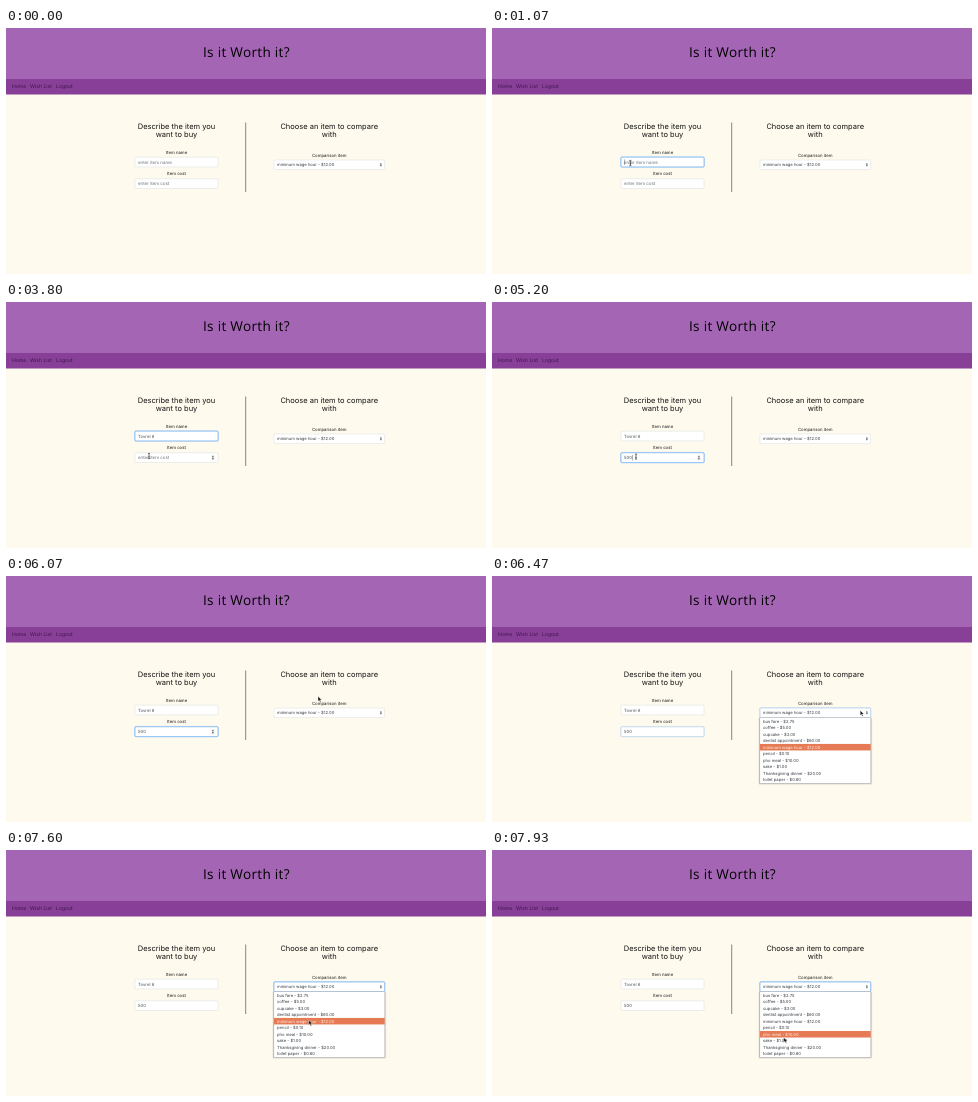
Write an HTML page that moves like this. It is 480 by 246 pixels and loops after 8 s.

```html
<!DOCTYPE html>
<html lang="en">
<head>
<meta charset="utf-8">
<title>Is it Worth it?</title>
<style>
  html, body { margin: 0; width: 100%; height: 100%; overflow: hidden; background: #fefaed; }
  svg { display: block; width: 100vw; height: 100vh; }
  text { font-family: Inter, "Open Sans", sans-serif; white-space: pre; text-rendering: geometricPrecision; }
  .mid { text-anchor: middle; }
  .title { font: 13.6px "Open Sans", sans-serif; letter-spacing: .3px; }
  .nav { font-size: 5.1px; fill: #43164f; }
  .head { font-size: 7.5px; fill: #151515; }
  .label { font-size: 4.3px; fill: #151515; }
  .hint { font-size: 4.45px; fill: #6c757d; }
  .value { font-size: 4.3px; fill: #495057; }
  .option { font-size: 4.17px; fill: #343a40; }
</style>
</head>
<body>
<svg id="stage" viewBox="0 0 480 246" preserveAspectRatio="none">
  <rect width="480" height="51" fill="#a565b5"/>
  <rect y="51" width="480" height="15.5" fill="#873f98"/>
  <text class="title mid" x="240.4" y="28.6">Is it Worth it?</text>
  <text class="nav" x="6" y="60.4">Home</text>
  <text class="nav" x="24" y="60.4">Wish List</text>
  <text class="nav" x="50" y="60.4">Logout</text>
  <text class="head mid" x="170.5" y="101">Describe the item you</text>
  <text class="head mid" x="170.5" y="109.2">want to buy</text>
  <text class="head mid" x="323.2" y="101">Choose an item to compare</text>
  <text class="head mid" x="323.2" y="109.2">with</text>
  <rect x="239.2" y="94.5" width="1" height="69.5" fill="#858585"/>
  <text class="label mid" x="170.5" y="125.8">Item name</text>
  <text class="label mid" x="170.5" y="147.4">Item cost</text>
  <text class="label mid" x="323.2" y="128.5">Comparison item</text>
</svg>
<script>
const TICK = 200 / 3, TICKS = 120;
const stage = document.getElementById('stage');

function add(tag, attrs, parent = stage, content = '') {
  const el = document.createElementNS('http://www.w3.org/2000/svg', tag);
  for (const k in attrs) el.setAttribute(k, attrs[k]);
  el.textContent = content;
  parent.append(el);
  return el;
}
const set = (el, name, value) => el.setAttribute(name, value);
const show = (el, on) => set(el, 'visibility', on ? 'visible' : 'hidden');
const ramp = (n, from, to) => Math.min(1, Math.max(0, (n - from) / (to - from)));

// White control with a blue focus ring on top
function control(x, y, w, h) {
  const box = { x, y, width: w, height: h, rx: 1.1 };
  add('rect', { ...box, fill: '#fff', stroke: '#ced4da', 'stroke-width': .4 });
  const ring = add('g', { fill: 'none', opacity: 0 });
  add('rect', { x: x - .4, y: y - .4, width: w + .8, height: h + .8, rx: 1.4,
    stroke: '#007bff', 'stroke-opacity': .28, 'stroke-width': .9 }, ring);
  add('rect', { ...box, stroke: '#6fb2fa', 'stroke-width': .5 }, ring);
  return ring;
}

function field(y, hint, value, typed, carets) {
  const ring = control(129, y, 83, 9.7);
  const base = y + 6.4;
  return {
    y, value, typed, carets, ring,
    hint: add('text', { class: 'hint', x: 132, y: base }, stage, hint),
    text: add('text', { class: 'value', x: 132, y: base }),
    caret: add('rect', { y: y + 2.2, width: .4, height: 5.4, fill: '#333' })
  };
}

// carets: [on, off] spans in ticks
const nameField = field(129.2, 'enter item name', 'Tovrel 6',
  [27, 31, 34, 37, 38, 40, 41, 43], [[14, 23], [27, 46]]);
const costField = field(150.8, 'enter item cost', '500', [70, 76, 78], [[61, 68], [70, 84]]);
const fields = [nameField, costField];

const spinner = add('g', {});
add('rect', { x: 205.4, y: 153, width: 3, height: 5.4, rx: .5, fill: '#eee' }, spinner);
add('path', { d: 'M205.9 155.2l1-1.5 1 1.5zM205.9 156.2l1 1.5 1-1.5z', fill: '#444' }, spinner);

const selectRing = control(268, 132, 110.6, 9.6);
add('text', { class: 'option', x: 271, y: 138.2 }, stage, 'minimum wage hour - $12.00');
add('path', { d: 'M373.9 136.4l1-1.4 1 1.4zM373.9 137.2l1 1.4 1-1.4z', fill: '#343a40' });

const items = ['bus fare - $2.75', 'coffee - $5.00', 'cupcake - $3.00',
  'dentist appointment - $60.00', 'minimum wage hour - $12.00', 'pencil - $0.10',
  'pho meal - $10.00', 'sake - $1.00', 'Thanksgiving dinner - $20.00', 'toilet paper - $0.60'];
const TOP = 141.8, ROW = 6.53;
const menu = add('g', {});
[.06, .1, .16].forEach((a, i) => add('rect', { x: 266.4 + i * .5, y: TOP, width: 113.8 - i,
  height: 67 - i * .5, rx: 1, fill: '#000', 'fill-opacity': a }, menu));
add('rect', { x: 267.9, y: TOP - .1, width: 110.9, height: 65.6, fill: '#fff',
  stroke: '#a9a9a9', 'stroke-width': .35 }, menu);
const bar = add('rect', { x: 268, width: 110.7, height: ROW, fill: '#e57a54' }, menu);
const options = items.map((s, i) =>
  add('text', { class: 'option', x: 271, y: TOP + ROW * i + 4.75 }, menu, s));

const arrow = add('path', { d: 'M0 0v5l1.2-1.1.9 2 .9-.4-.9-1.9h1.6z',
  fill: '#111', stroke: '#fff', 'stroke-width': .4 });
const beam = add('path', { d: 'M-1-2.7q1 0 1 .6 0-.6 1-.6M0-2.1v4.2M-1 2.7q1 0 1-.6 0 .6 1 .6M-.6.9h1.2',
  fill: 'none', stroke: '#111', 'stroke-width': .6 });

// Pointer path: tick, x, y
const path = [
  [4, 13, 116], [6, 75, 122], [8, 122, 131], [10, 138.4, 135],
  [53, 138.4, 135], [55, 140, 145], [57, 143, 154], [59, 144, 154.6],
  [84, 144, 154.6], [87, 190, 134], [90, 275, 117], [93, 386, 127], [96, 368.2, 134.4],
  [103, 368.2, 134.4], [106, 352, 146], [109, 327.4, 151.2],
  [112, 312, 160], [115, 298, 175], [119, 289.6, 191.6]
];
function pointer(n) {
  const i = path.findIndex(p => p[0] >= n);
  if (i < 1) return path[i < 0 ? path.length - 1 : 0].slice(1);
  const [a, ax, ay] = path[i - 1], [b, bx, by] = path[i];
  const k = (n - a) / (b - a);
  return [ax + (bx - ax) * k, ay + (by - ay) * k];
}

function draw(time) {
  const n = Math.floor((time + 1) / TICK) % TICKS;
  const [x, y] = pointer(n);
  const over = f => n >= 4 && x > 129 && x < 212 && y > f.y && y < f.y + 9.7;

  for (const f of fields) {
    const count = f.typed.filter(t => t <= n).length;
    f.text.textContent = f.value.slice(0, count);
    show(f.hint, !count);
    set(f.caret, 'x', 132.1 + (count ? f.text.getComputedTextLength() : 0));
    show(f.caret, f.carets.some(([a, b]) => n >= a && n < b));
  }
  set(nameField.ring, 'opacity', ramp(n, 13, 16) - ramp(n, 60, 63));
  set(costField.ring, 'opacity', ramp(n, 60, 63) - ramp(n, 95.5, 98));
  set(selectRing, 'opacity', ramp(n, 96, 98));
  show(spinner, over(costField) || (n >= 61 && n < 96));

  const open = n >= 96;
  const row = Math.floor((y - TOP) / ROW);
  const active = row < 0 ? 4 : row;
  show(menu, open);
  set(bar, 'y', TOP + ROW * active);
  options.forEach((o, i) => o.style.fill = i === active ? '#fff1e6' : '');

  const typing = fields.some(over);
  show(beam, typing);
  show(arrow, n >= 4 && !typing);
  for (const c of [beam, arrow]) set(c, 'transform', `translate(${x} ${y})`);
}

const start = performance.now();
function loop() {
  draw(performance.now() - start);
  requestAnimationFrame(loop);
}
loop();
</script>
</body>
</html>
```
